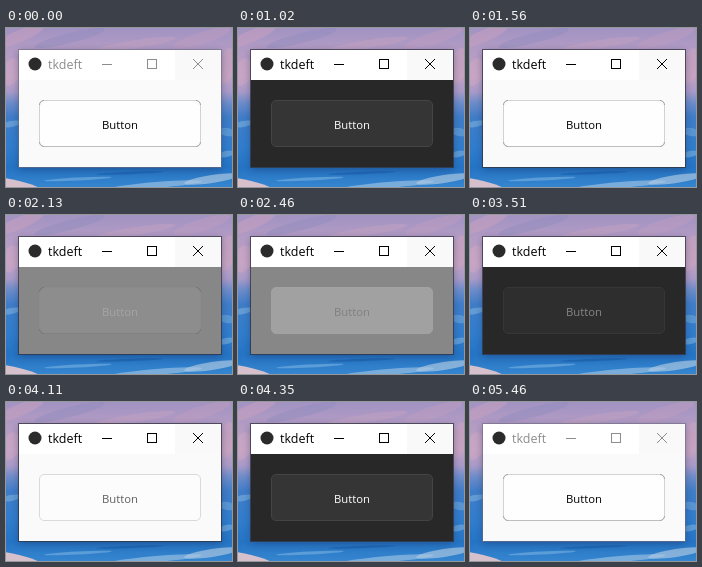
An HTML page with a canvas that plays this animation: 226 by 159 pixels, repeating every 5.55 s.

```html
<!DOCTYPE html>
<html lang="en">
<head>
<meta charset="utf-8">
<title>Theme toggle</title>
<style>
html, body { margin: 0; width: 100%; height: 100%; overflow: hidden; }
canvas { display: block; width: 226px; height: 159px; }
</style>
</head>
<body>
<canvas id="stage" width="226" height="159"></canvas>
<script>
const ctx = document.getElementById('stage').getContext('2d');
const LOOP = 5550, STEP = 30, FADE_STEPS = 4;
const FONT = '"Open Sans", "Noto Sans", sans-serif';

// Each click: moment of press, first fade step, theme it leads to (1 = light).
const clicks = [
  [840, 930, 0], [1380, 1470, 1],
  [1860, 1920, 0], [2040, 2100, 1], [2340, 2430, 0], [2580, 2670, 1], [2820, 2910, 0],
  [3510, 3600, 1], [4110, 4260, 0], [4830, 5040, 1]
];

const mix = (a, b, k) => a + (b - a) * k;
const gray = v => { const n = Math.round(v); return `rgb(${n},${n},${n})`; };

function rect(x, y, w, h, color) {
  ctx.fillStyle = color;
  ctx.fillRect(x, y, w, h);
}

function line(color, width, ...points) {
  ctx.strokeStyle = color;
  ctx.lineWidth = width;
  ctx.beginPath();
  points.forEach(([x, y], i) => i ? ctx.lineTo(x, y) : ctx.moveTo(x, y));
  ctx.stroke();
}

function text(label, x, y, size, color, align) {
  ctx.font = `500 ${size}px ${FONT}`;
  ctx.textAlign = align;
  ctx.fillStyle = color;
  ctx.fillText(label, x, y);
}

function blob(x, y, rx, ry, angle, color) {
  ctx.fillStyle = color;
  ctx.beginPath();
  ctx.ellipse(x, y, rx, ry, angle, 0, Math.PI * 2);
  ctx.fill();
}

function wallpaper() {
  const sky = ctx.createLinearGradient(0, 0, 0, 159);
  [[0, '#a193c2'], [0.12, '#b09ac4'], [0.3, '#c0a2c6'], [0.4, '#a99ac8'],
   [0.47, '#6d8cca'], [0.56, '#3f7cc8'], [0.75, '#2f7ccc'], [0.88, '#2473c4'], [1, '#3585cf']]
    .forEach(([at, color]) => sky.addColorStop(at, color));
  rect(0, 0, 226, 159, sky);

  // Clouds
  blob(14, 8, 26, 6, -0.4, 'rgba(200,160,192,.55)');
  blob(64, 10, 36, 5, -0.25, 'rgba(140,138,190,.4)');
  blob(130, 16, 40, 4, -0.15, 'rgba(196,162,194,.5)');
  blob(196, 10, 30, 6, -0.3, 'rgba(190,156,190,.45)');
  blob(221, 38, 8, 18, 0.2, 'rgba(206,164,190,.5)');
  blob(5, 44, 9, 14, 0.3, 'rgba(208,168,196,.5)');

  // Water and foam
  blob(5, 96, 10, 3, -0.2, 'rgba(130,180,222,.55)');
  blob(221, 104, 9, 4, 0.2, 'rgba(120,174,220,.5)');
  blob(220, 126, 9, 3, -0.2, 'rgba(132,182,224,.55)');
  blob(4, 158, 36, 7, 0.2, '#d6c0cc');
  blob(72, 151, 34, 1.5, -0.05, 'rgba(120,178,226,.6)');
  blob(124, 145, 34, 1.2, -0.04, 'rgba(24,92,170,.6)');
  blob(150, 157, 46, 3, -0.08, 'rgba(150,190,226,.7)');
  blob(206, 151, 28, 4, -0.15, 'rgba(168,198,226,.7)');
}

function windowFrame(active) {
  ctx.save();
  ctx.shadowColor = 'rgba(20,30,70,.4)';
  ctx.shadowBlur = 8;
  ctx.shadowOffsetY = 2;
  rect(13, 22, 202, 117, '#fff');
  ctx.restore();
  rect(12, 21, 204, 119, active ? 'rgba(50,50,60,.75)' : 'rgba(110,110,125,.6)');
}

function titleBar(active) {
  const ink = active ? '#000' : '#8c8c8c';
  rect(13, 22, 202, 30, '#fff');
  rect(169, 22, 46, 30, '#f9f9f9');
  blob(29, 36, 6.5, 6.5, 0, '#2b2b2b');
  text('tkdeft', 42, 41, 12.5, ink, 'left');
  line(ink, 1, [96, 36.5], [106, 36.5]);
  ctx.strokeRect(141.5, 31.5, 9, 9);
  line(ink, 1, [187, 31], [197, 41]);
  line(ink, 1, [197, 31], [187, 41]);
}

function button({ level, target, pressed, fading }, bg) {
  const toLight = fading && target;
  let veil = toLight ? mix(0.03, 0.7, level ** 5) : mix(0.06, 0.7, level ** 2);
  let ink = toLight ? mix(255, 0, level ** 1.5) : mix(255, 0, level);
  let edge = mix(68, 210, toLight ? level : level ** 0.6);
  if (pressed) {
    veil = level ? 0.3 : 0.03;
    ink = level ? 96 : 134;
    edge = level ? 218 : 54;
  }
  ctx.beginPath();
  ctx.roundRect(33.5, 72.5, 161, 46, 4.5);
  ctx.fillStyle = gray(mix(bg, 255, veil));
  ctx.fill();
  ctx.strokeStyle = gray(edge);
  ctx.lineWidth = 1;
  ctx.stroke();

  // Light theme: heavier corners and lower edge.
  if (target && level > 0 && !pressed) {
    ctx.strokeStyle = gray(edge - 45 * level);
    for (const [x, y, turn] of [[38, 77, 2], [190, 77, 3], [190, 114, 0], [38, 114, 1]]) {
      ctx.beginPath();
      ctx.arc(x, y, 4.5, turn * Math.PI / 2, (turn + 1) * Math.PI / 2);
      ctx.stroke();
    }
    line(gray(edge - 20 * level), 1, [38, 118.5], [190, 118.5]);
  }
  text('Button', 114, 101, 11.3, gray(ink), 'center');
}

function stateAt(t) {
  const state = { level: 1, target: 1, pressed: false, fading: false };
  for (const [press, start, target] of clicks) {
    if (t < press) break;
    state.pressed = t < start;
    if (state.pressed) break;
    const k = Math.min(1, (Math.floor((t - start) / STEP) + 1) / FADE_STEPS);
    state.target = target;
    state.level = target ? k : 1 - k;
    state.fading = k < 1;
  }
  return state;
}

function draw(t) {
  const state = stateAt(t);
  const active = t >= 420 && t < 5460;
  const bg = mix(40, 250, state.level ** 1.15);
  wallpaper();
  windowFrame(active);
  titleBar(active);
  rect(13, 52, 202, 87, gray(bg));
  button(state, bg);
}

function tick() {
  draw(performance.now() % LOOP);
  requestAnimationFrame(tick);
}
tick();
</script>
</body>
</html>
```
